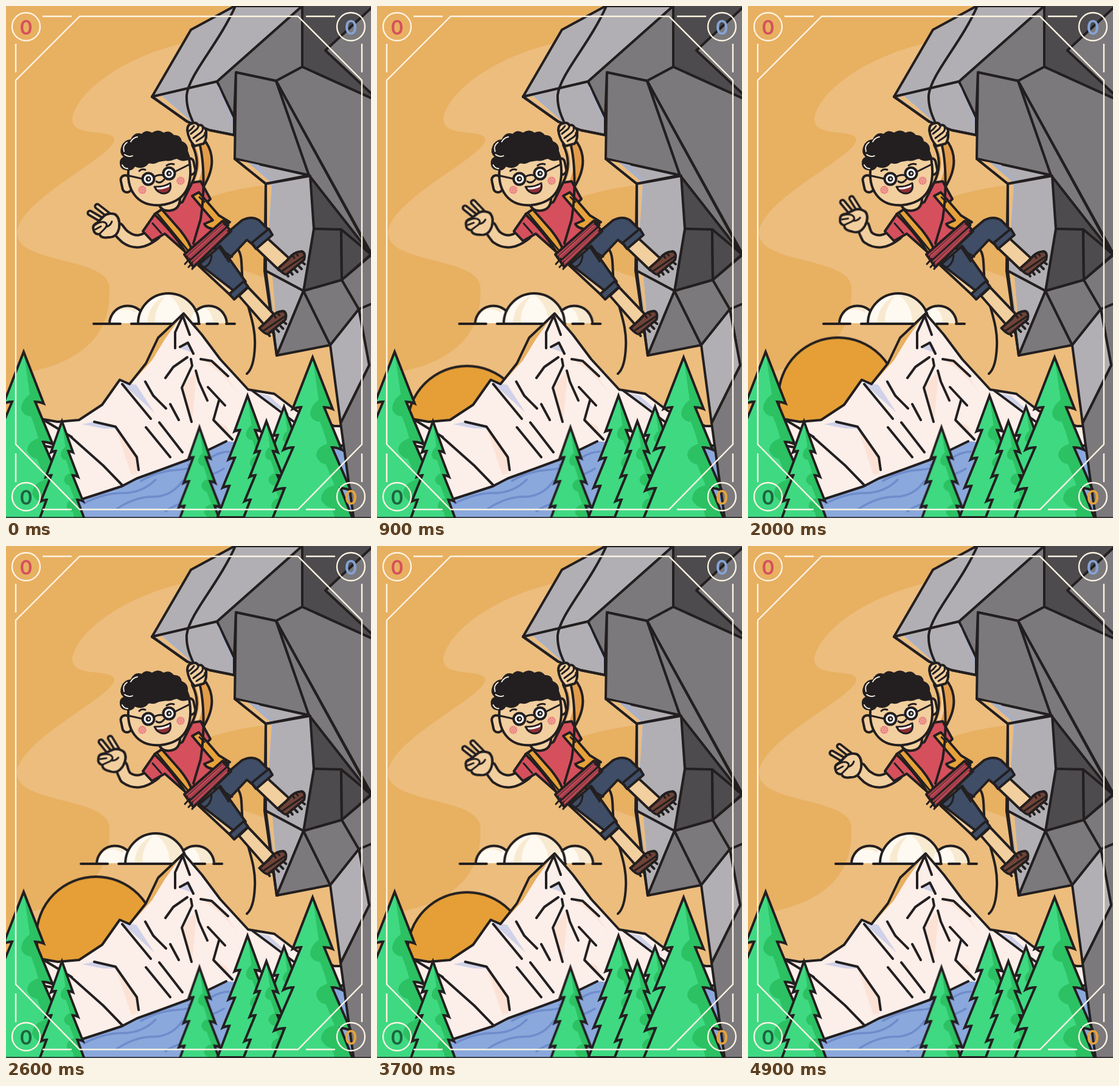
Recreate the animation shown at these times as an HTML page. Size 600 by 841 pixels, loop 5000 ms.

```html
<!DOCTYPE html>
<html lang="en">
<head>
<meta charset="utf-8">
<title>Climber</title>
<style>
html, body { margin: 0; width: 100%; height: 100%; overflow: hidden; background: #e8b061; }
svg { display: block; width: 100%; height: 100%; }
.ink, .box { stroke: #231f20; stroke-width: 4; stroke-linejoin: round; stroke-linecap: round; }
.ink { fill: none; }
.thin { stroke-width: 3; }
.bark { stroke-width: var(--w, 4); stroke-linejoin: miter; }
.skin { fill: #f2cf9f; }
.lite { fill: #b1afb3; }
.mid { fill: #7b797b; }
.dark { fill: #4d4b4d; }
.red { fill: #d5505c; }
.gold { fill: #e7a23a; }
.navy { fill: #3f4d66; }
.boot { fill: #704337; }
.rim { fill: none; stroke: #fff3e3; stroke-width: 2.4; }
.num { font: 600 32px Inter, "Open Sans", sans-serif; text-anchor: middle; }
.sun { animation: sun 5s infinite; }
.cloud { animation: drift 5s infinite cubic-bezier(.33, 0, .42, 1); }
.wave { transform-origin: 197px 380px; animation: wave 5s infinite cubic-bezier(.33, 0, .42, 1); }
@keyframes sun {
  0% { transform: translateY(180px); animation-timing-function: cubic-bezier(.33, .955, .67, 1); }
  48.6% { transform: none; animation-timing-function: cubic-bezier(.33, 0, .67, .06); }
  100% { transform: translateY(180px); }
}
@keyframes drift { 0%, 100% { transform: none; } 50% { transform: translateX(-21px); } }
@keyframes wave { 0%, 100% { transform: none; } 50% { transform: rotate(21deg); } }
</style>
</head>
<body>
<svg viewBox="0 0 600 841" preserveAspectRatio="none">
<defs>
  <path id="fir" d="M0 0L33 85Q26 82 19 82L48 152Q40 148 32 148L63 219Q54 215 46 215L76 290H-76L-46 215Q-54 215 -63 219L-32 148Q-40 148 -48 152L-19 82Q-26 82 -33 85Z"/>
  <clipPath id="firClip"><use href="#fir"/></clipPath>
  <g id="tree">
    <use href="#fir" fill="#3fd982"/>
    <path clip-path="url(#firClip)" fill="#2cc163" d="M0 0L10 70Q-4 80 -4 94Q0 106 12 106Q20 126 24 142Q6 148 6 162Q10 174 22 176L36 210Q14 216 14 234Q20 246 32 248L44 290H90V0Z"/>
    <use href="#fir" class="ink bark"/>
  </g>
  <g id="puffs"><circle cx="200" cy="522" r="30"/><circle cx="333" cy="522" r="30"/><circle cx="267" cy="523" r="50"/></g>
  <clipPath id="puff">
    <path d="M170 521A30 30 0 0 1 230 521ZM303 521A30 30 0 0 1 363 521ZM217 521A50 50 0 0 1 317 521Z"/>
  </clipPath>
  <filter id="soft" x="-10%" y="-20%" width="120%" height="140%"><feGaussianBlur stdDeviation=".7"/></filter>
</defs>

<!-- sky -->
<rect width="600" height="841" fill="#e8b061"/>
<path fill="#ecbd7d" d="M310 57C210 76 120 132 109 184C107 218 176 200 178 219C180 246 19 318 18 374C20 424 168 412 170 462C172 520 150 585 16 605V700H560V57Z"/>
<path fill="#e8b061" d="M300 326Q360 302 428 294L430 448L385 432L340 400Z"/>

<g class="sun"><circle cx="148" cy="641" r="98" fill="#e59f36" class="box"/></g>

<g class="cloud" filter="url(#soft)">
  <g clip-path="url(#puff)">
    <rect x="165" y="465" width="202" height="60" fill="#f8ead1"/>
    <circle cx="196" cy="522" r="24" fill="#fffaf1"/>
    <ellipse cx="250" cy="520" rx="40" ry="50" fill="#fffaf1"/>
    <path fill="#f8ead1" d="M232 522Q234 488 262 476Q242 500 246 522Z"/>
    <ellipse cx="322" cy="522" rx="18" ry="28" fill="#fffaf1"/>
  </g>
  <path class="ink" d="M170 522A30 30 0 0 1 221 501M217 522A50 50 0 0 1 317 522M312 501A30 30 0 0 1 363 522M144 522H188M206 522H318M330 522H348M362 522H376"/>
</g>

<!-- mountain -->
<path fill="#fceee9" d="M0 677L45 676L85 683L120 680L158 655L187 614L203 621L230 587L250 545L292 505L322 540L352 580L398 630L441 637L478 665L540 690H556V841H0Z"/>
<path fill="#e8b061" d="M290 507L250 545L230 587L205 621L240 582L262 546Z"/>
<path fill="#cfd2e8" d="M190 619L214 622L244 668Z M125 687L150 682L182 694L160 694Z M298 550L308 570L286 562Z M405 634L432 640L470 674Z M222 610L240 634L262 660L236 634Z"/>
<path fill="#fce2d5" d="M288 628L314 597L306 683Z M180 692L215 740L216 768L206 770Z M322 580L344 584L382 636L352 602Z M340 680L362 690L372 712Z"/>
<path fill="#8aa8dc" d="M90 822L122 811L190 789L215 776L300 745L362 715L450 720H556L575 841H90Z"/>
<path fill="none" stroke="#6f8ccb" stroke-width="3.5" stroke-linecap="round" d="M128 817Q160 800 192 800T246 778M182 826Q212 806 242 806T290 780M222 780Q250 764 280 762T300 754M336 742Q352 732 366 732M262 830Q276 820 288 818M326 772Q342 770 358 760"/>
<path class="ink" d="M0 677L45 676L85 683L120 680L158 655L187 614L203 621L230 587L250 545L292 505L322 540L352 580L398 630L441 637L478 665L540 690H556M122 811L190 789L215 776L300 745L362 715M524 722H556"/>
<path class="ink" d="M290 510L278 536V562M291 510L302 540M286 560L299 553L308 571M262 611L275 593L298 577M304 580L306 591L289 627L305 683M320 580L338 583L365 608M312 599L317 617L331 648M191 621L238 678M229 617L242 640L263 661M252 684L290 733M230 692L270 741M270 654L284 680M145 683L180 691L215 741L218 762M107 708L160 755L192 788M350 648L341 680L372 712M332 626L360 656M405 632L432 652L472 682M62 680L108 708M60 722L82 726"/>

<!-- cliff -->
<g class="box">
  <path class="lite" d="M240 149L304 39L376 0H487L347 124Z"/>
  <path class="lite" d="M240 149L347 124L375 183V212L335 204L298 190Z"/>
  <path class="mid" d="M487 -4V100L444 123L378 109L375 183L347 124L487 0Z"/>
  <path class="mid" d="M378 109L444 123L498 278L376 251Z"/>
  <path class="dark" d="M487 -4V100L604 153V-4Z"/>
  <path class="mid" d="M604 0L525 73L604 147Z"/>
  <path class="mid" d="M487 100L444 123L604 413V153Z"/>
  <path class="mid" d="M444 123L498 278L600 408Z"/>
  <path class="lite" d="M376 251L427 292L498 278Z"/>
  <path class="dark" d="M498 278L600 408L551 367H506Z"/>
  <path class="dark" d="M506 366L551 367L552 450L489 468Z"/>
  <path class="dark" d="M551 367L600 408L552 450Z"/>
  <path class="lite" d="M427 292L500 279L506 366L489 468L427 435Z"/>
  <path class="lite" d="M427 435L489 468L445 574Z"/>
  <path class="mid" d="M489 468L533 557L445 574Z"/>
  <path class="mid" d="M489 468L552 450L580 498L533 557Z"/>
  <path class="mid" d="M552 450L604 406V488L580 498Z"/>
  <path class="mid" d="M580 498L604 488V845H572L550 685L597 590Z"/>
  <path class="lite" d="M580 498L597 590L550 685L533 557Z"/>
</g>
<path fill="#ecbd7d" d="M247 150L257 148L302 186L298 187Z M382 254L398 257L434 288L427 289Z M430 294H437L434 350L430 395Z M430 439L438 444L446 540Z"/>
<path fill="#a9b0c6" d="M257 148L264 146L306 187L302 187Z M398 257L416 261L440 287L434 288Z M437 294H442L435 350L430 430V395Z M346 128L350 134L373 188V196Z"/>
<path class="ink" d="M240 149L298 190L335 204L375 212M376 251L427 292L425 435L445 574"/>

<!-- ropes -->
<path class="ink" d="M378 -2C350 62 302 110 297 146C296 166 303 182 312 200M380 398C392 412 384 440 392 470C400 504 411 528 409 560C408 584 403 598 396 604"/>

<!-- raised arm -->
<path class="box" fill="#e39c4a" d="M305 292C316 270 317 250 306 228L329 224C346 250 338 278 320 304Z"/>
<path fill="#f2cf9f" d="M309 290C320 268 320 248 311 230L318 228C328 250 324 274 312 296Z"/>

<!-- legs -->
<g class="box">
  <path class="skin" d="M407 394L449 434L465 414L428 380Z"/>
  <path class="navy" d="M338 394L388 352Q404 344 416 352L434 370L408 394L396 384L364 418Z"/>
  <path class="navy" d="M432 366L438 376L411 399L404 389Z"/>
  <path class="skin" d="M383 476L424 523L440 506L398 462Z"/>
  <path class="skin" d="M316 426L332 420L384 472L372 478Z"/>
  <path class="navy" d="M318 424L352 394L394 453L376 469Z"/>
  <path class="navy" d="M391 452L398 461L375 482L367 473Z"/>
</g>
<path class="ink thin" d="M322 430Q336 428 338 410M356 402L372 412M350 396L366 420"/>
<g id="shoe">
  <path class="ink" d="M461 440L464 444M468 437L471 441M475 433L479 437M482 428L486 432M487 421L491 424"/>
  <path class="box boot" d="M447 431L464 416Q472 404 486 403Q493 405 490 417L461 441Q456 441 447 431Z"/>
  <path class="ink thin" d="M470 409L474 414M476 405L480 410M453 436L490 411"/>
</g>
<use href="#shoe" transform="translate(-30.5 98)"/>

<!-- waving arm -->
<path class="ink" style="stroke-width:24" d="M244 374C225 389 211 390 197 380"/>
<path class="ink wave" style="stroke-width:23" d="M197 380Q190 375 184 366"/>
<path class="ink" style="stroke:#f2cf9f;stroke-width:16" d="M244 374C225 389 211 390 197 380"/>
<g class="wave">
  <path class="ink" style="stroke:#f2cf9f;stroke-width:15" d="M197 380Q190 375 184 366"/>
  <path class="ink" style="stroke-width:11" d="M150 329L172 346M138 340L162 354"/>
  <path class="ink" style="stroke:#f2cf9f;stroke-width:3.5" d="M150 329L172 346M138 340L162 354"/>
  <path class="box skin" d="M161 345Q168 339 179 342Q188 348 186 364Q183 380 169 380Q156 382 154 375Q145 375 144 368Q141 360 150 356Q156 350 161 345Z"/>
  <path class="ink thin" d="M146 360Q154 354 161 355Q168 357 164 364L154 374M164 363Q172 361 174 354M147 367L156 362"/>
</g>

<!-- body -->
<g class="box">
  <path class="red" d="M243 344L290 322L306 290L320 288L336 317L328 325L365 360L304 412L261 374L240 386L225 370Z"/>
  <path class="skin" d="M250 322Q254 338 270 336Q286 334 286 316Z"/>
  <path class="gold" d="M244 342L256 334L286 368Q302 388 306 402L298 410Q282 380 244 342Z"/>
  <path class="gold" d="M306 312L317 306L350 344L368 355L346 367Q330 366 326 358L340 352Z"/>
</g>
<path class="ink thin" d="M241 357L255 373M318 314L326 322M249 341L301 404"/>
<path class="box" fill="#a83f4c" d="M293 408L356 353L370 370L308 429Z"/>
<path class="ink thin" d="M297 413L360 357M301 419L364 362M305 424L368 367M294 424L302 415M300 429L308 420M306 432L312 424M358 350L366 360"/>
<path class="ink" style="stroke:#d5505c;stroke-width:2" d="M300 411L357 360M308 422L363 371"/>
<path class="ink" d="M317 222C326 252 327 306 320 350L308 390"/>

<!-- holding hand -->
<path class="box skin" d="M298 204Q298 194 306 193Q313 190 316 196Q322 194 325 200Q330 202 329 209Q330 218 325 226L310 230Q300 220 298 204Z"/>
<path class="ink thin" d="M304 210L314 202Q318 197 315 195M308 217L320 208Q325 203 323 200M313 222L322 216Q328 212 327 208M300 206Q305 203 309 197"/>

<!-- head -->
<g class="box skin">
  <rect x="190" y="278" width="15" height="28" rx="7" transform="rotate(-12 198 292)"/>
  <rect x="296" y="250" width="14" height="27" rx="7" transform="rotate(-12 303 264)"/>
  <path d="M202 262C196 302 216 330 254 327C292 323 311 298 300 246Z"/>
</g>
<path fill="#231f20" d="M200 270Q188 270 187 259Q186 251 193 248Q185 241 190 230Q194 220 205 219Q211 206 223 210Q230 202 240 208Q250 201 259 208Q269 203 276 212Q287 211 289 222Q300 226 299 238Q303 246 300 253Q288 257 280 250Q268 258 256 252Q246 262 235 258Q226 270 212 264Q208 271 200 270Z"/>
<path fill="none" stroke="#fff6e8" stroke-width="1.8" stroke-linecap="round" d="M194 239Q191 229 199 224M205 223Q209 216 216 215M195 244Q201 249 208 246M191 261Q194 267 200 267"/>
<path class="ink thin" d="M203 279L225 284M278 272L302 260M243 281Q250 276 258 278M219 271Q223 267 229 269M264 262Q270 258 276 260"/>
<g id="eye"><circle class="box" cx="234" cy="284" r="9.5" fill="#fff"/><circle cx="234" cy="284" r="4.5" fill="#231f20"/><circle cx="234.5" cy="284" r="1.7" fill="#fff"/></g>
<use href="#eye" x="34" y="-9"/>
<path class="ink thin" d="M247 288Q253 293 260 285"/>
<path class="box thin" fill="#8f2f35" d="M244 297Q258 298 270 291Q273 306 260 308Q249 308 244 297Z"/>
<path fill="#fff" d="M247 298Q259 299 269 293L268 297Q258 302 249 301Z"/>
<g id="blush"><circle cx="224" cy="302" r="7" fill="#f0a092"/><circle cx="224" cy="302" r="5" fill="none" stroke="#d5505c" stroke-width="1.4" stroke-dasharray="1.4 2"/><circle cx="224" cy="302" r="1.8" fill="none" stroke="#d5505c" stroke-dasharray="1 1.5"/></g>
<use href="#blush" x="63" y="-15"/>

<!-- trees: --w undoes the scale of the outline -->
<use href="#tree" transform="translate(29 568)"/>
<use href="#tree" transform="translate(92 682) scale(.55 .6)" style="--w:7"/>
<use href="#tree" transform="translate(318 692) scale(.54 .6)" style="--w:7"/>
<use href="#tree" transform="translate(457 658) scale(.54 .57)" style="--w:7"/>
<use href="#tree" transform="translate(397 640) scale(.65 .69)" style="--w:6"/>
<use href="#tree" transform="translate(428 682) scale(.57 .6)" style="--w:7"/>
<use href="#tree" transform="translate(504 577)"/>
<path d="M0 840H600" stroke="#231f20" stroke-width="1.5"/>

<!-- card frame -->
<path class="rim" d="M121 17H480L585 122V720L480 827H121L16 720V122ZM60 17H108M493 17H541M60 827H108M493 827H541M16 62V109M585 62V109M16 735V782M585 735V782"/>
<g class="rim">
  <circle cx="33" cy="34" r="23"/><circle cx="567" cy="34" r="23"/>
  <circle cx="33" cy="806" r="23"/><circle cx="567" cy="806" r="23"/>
</g>
<g class="num">
  <text x="33" y="46.5" fill="#d5505c">0</text>
  <text x="567" y="46.5" fill="#84a3d6">0</text>
  <text x="33" y="818.5" fill="#1d6340">0</text>
  <text x="567" y="818.5" fill="#e7a23a">0</text>
</g>
</svg>
</body>
</html>
```
